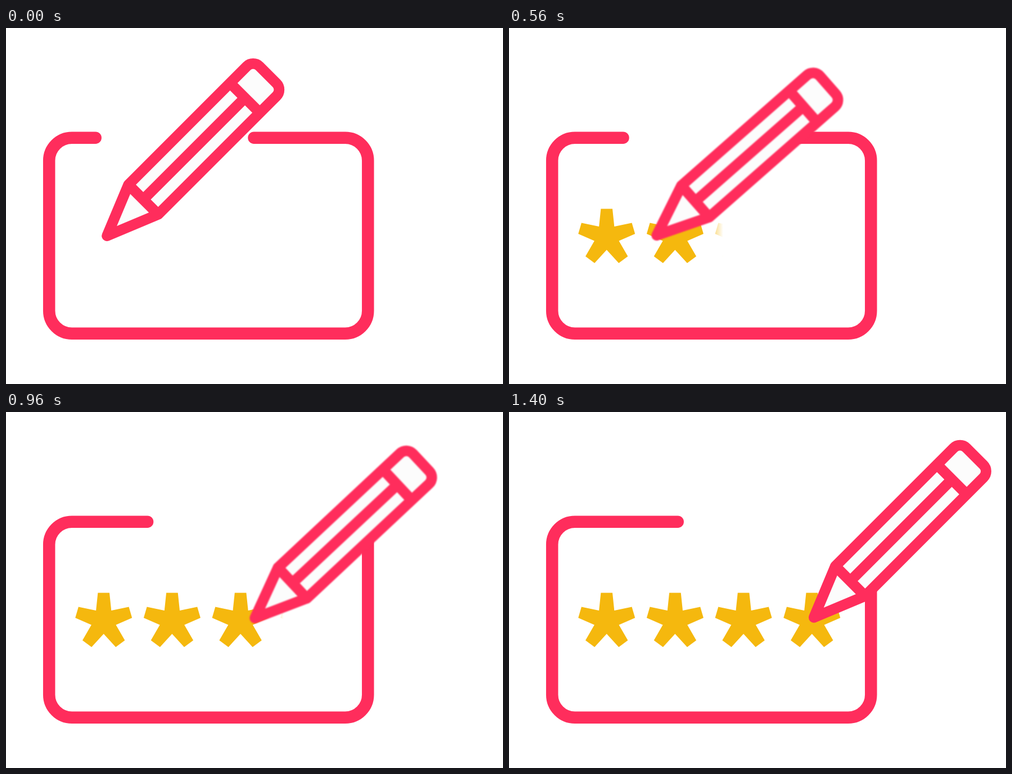
An HTML page with a canvas that plays this animation: 884 by 633 pixels, repeating every 1440 ms.

```html
<!DOCTYPE html>
<html lang="en">
<head>
<meta charset="utf-8">
<title>Pencil writing a password</title>
<style>
  html, body { margin: 0; width: 100%; height: 100%; overflow: hidden; background: #fff; }
  canvas { display: block; }
</style>
</head>
<body>
<canvas id="stage" width="884" height="633"></canvas>
<script>
const ctx = document.getElementById('stage').getContext('2d');
const LOOP = 1440, STEP = 40, START = 200, END = 1360;
const PINK = '#ff2d5c', PAPER = '#fcfcfc';

// Pencil tilt in degrees and reveal edge in pixels, as [time, value] keys
const TILT = [[200, 45], [360, 49.2], [560, 41.3], [620, 40.4], [720, 43.2], [840, 50],
  [960, 43.1], [1060, 40], [1160, 43.2], [1280, 49.8], [1400, 45]];
const REVEAL = [[200, 100], [360, 232], [560, 365], [720, 365], [960, 478], [1160, 540], [1360, 612]];

// Right half of an asterisk, relative to its centre line
const STAR_HALF = [[10.3, 321.5], [13.6, 353], [44.8, 346.5], [50.5, 366], [21.8, 378.5],
  [37.7, 406], [21.5, 418], [0, 394.5]];
const STAR = [...STAR_HALF, ...STAR_HALF.slice(0, -1).reverse().map(([x, y]) => [-x, y])];

const mix = (a, b, p) => a + (b - a) * p;
const smooth = p => p * p * (3 - 2 * p);

function segment(keys, t) {
  let i = 0;
  while (i < keys.length - 2 && t > keys[i + 1][0]) i++;
  const [t0, t1] = [keys[i][0], keys[i + 1][0]];
  return { i, span: t1 - t0, p: Math.min(1, Math.max(0, (t - t0) / (t1 - t0))) };
}

function linear(keys, t) {
  const { i, p } = segment(keys, t);
  return mix(keys[i][1], keys[i + 1][1], p);
}

function spline(keys, t) {
  const { i, span, p } = segment(keys, t);
  const slope = k => k === 0 || k === keys.length - 1 ? 0
    : (keys[k + 1][1] - keys[k - 1][1]) / (keys[k + 1][0] - keys[k - 1][0]);
  const q = 1 - p;
  return mix(keys[i][1], keys[i + 1][1], smooth(p))
    + span * p * q * (q * slope(i) - p * slope(i + 1));
}

function drawCard(leftEnd, cut) {
  const l = 76.7, r = 643.8, top = 195.2, bottom = 543.3, radius = 40.5;
  ctx.save();
  ctx.lineWidth = 21.5;
  ctx.setLineDash([5000, 5000]);
  ctx.lineDashOffset = -5000 - (5000 + cut) % 10000 + 10000 - 5000 + 5000;
  ctx.lineDashOffset = -cut;
  ctx.lineDashOffset += cut > 0 ? 0 : 0;
  ctx.beginPath();
  ctx.moveTo(441, top);
  ctx.arcTo(r, top, r, bottom, radius);
  ctx.arcTo(r, bottom, l, bottom, radius);
  ctx.arcTo(l, bottom, l, top, radius);
  ctx.arcTo(l, top, leftEnd, top, radius);
  ctx.lineTo(leftEnd, top);
  ctx.stroke();
  ctx.restore();
}

function drawStars(edge) {
  const fade = ctx.createLinearGradient(edge - 16, 0, edge + 16, 0);
  fade.addColorStop(0, 'rgba(245,184,14,1)');
  fade.addColorStop(1, 'rgba(245,184,14,0)');
  ctx.fillStyle = fade;
  for (let i = 0; i < 4; i++) {
    ctx.beginPath();
    for (const [x, y] of STAR) ctx.lineTo(173.7 + i * 121.7 + x, y);
    ctx.fill();
  }
}

// The pencil lies along +x with the centre of its tip at the origin
function drawPencil(x, y, degrees, soft) {
  const half = 37.4, shoulder = 91.4, ferrule = 347, end = 405, radius = 16;
  ctx.save();
  if (soft) ctx.filter = 'blur(1.1px)';
  ctx.translate(x, y);
  ctx.rotate(-degrees * Math.PI / 180);
  ctx.lineWidth = 18.8;
  ctx.fillStyle = PAPER;
  const pencil = new Path2D();
  pencil.moveTo(0, 0);
  pencil.lineTo(shoulder, -half);
  pencil.arcTo(end, -half, end, half, radius);
  pencil.arcTo(end, half, shoulder, half, radius);
  pencil.lineTo(shoulder, half);
  pencil.closePath();
  ctx.fill(pencil);
  for (const bar of [shoulder, ferrule]) {
    pencil.moveTo(bar, -half);
    pencil.lineTo(bar, half);
  }
  pencil.moveTo(shoulder, 0);
  pencil.lineTo(ferrule, 0);
  ctx.stroke(pencil);
  ctx.restore();
}

function draw(now) {
  const t = Math.max(START, Math.floor(now % LOOP / STEP) * STEP);
  const p = Math.min(1, (t - START) / (END - START));
  const glide = smooth(p);
  ctx.fillStyle = '#fff';
  ctx.fillRect(0, 0, 884, 633);
  ctx.strokeStyle = PINK;
  ctx.lineCap = ctx.lineJoin = 'round';
  drawCard(mix(159.2, 300.2, p), 242 * p);
  drawStars(linear(REVEAL, t));
  drawPencil(mix(179.6, 542.3, glide), mix(369.6, 365.3, glide), spline(TILT, t), t > START && t < 1400);
}

let origin;
function tick(now) {
  origin ??= now;
  draw(now - origin);
  requestAnimationFrame(tick);
}
draw(0);
requestAnimationFrame(tick);
</script>
</body>
</html>
```
